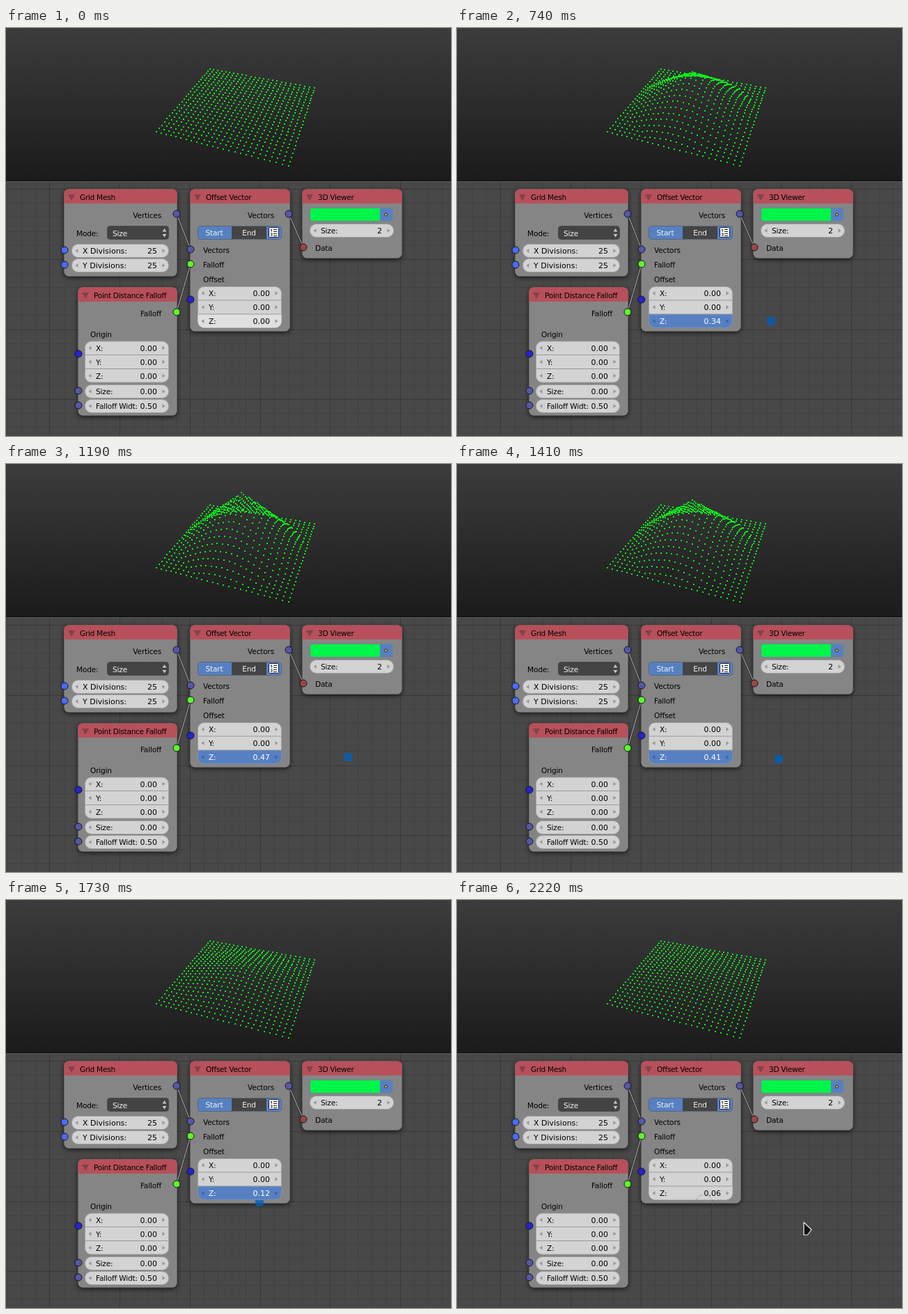
Animation, 639 px wide and 586 px high, one loop 2260 ms. Source, as an HTML page:

```html
<!DOCTYPE html>
<html lang="en">
<head>
<meta charset="utf-8">
<title>Offset with falloff</title>
<style>
  html, body { margin: 0; width: 100%; height: 100%; overflow: hidden; background: #484848; }
  svg { display: block; }
  text { font: 10.6px "DejaVu Sans", sans-serif; letter-spacing: -.2px; fill: #000; }
  .title { letter-spacing: -.3px; }
  .value { font-size: 11px; letter-spacing: 0; }
  .light { fill: #f2f2f2; }
  .field { fill: #d3d3d3; stroke: #a0a0a0; }
  .arrow { fill: #979797; }
</style>
</head>
<body>
<svg id="stage" width="639" height="586" viewBox="0 0 639 586">
  <defs>
    <linearGradient id="sky" x2="0" y2="1">
      <stop stop-color="#3c3c3c"/><stop offset="1" stop-color="#1b1b1b"/>
    </linearGradient>
    <filter id="shadow" x="-10%" y="-10%" width="120%" height="125%">
      <feDropShadow dx="0" dy="2" stdDeviation="3.5" flood-color="#000" flood-opacity=".7"/>
    </filter>
    <clipPath id="stack"><rect x="275.5" y="371.5" width="120" height="59" rx="9"/></clipPath>
  </defs>
  <rect width="639" height="219" fill="url(#sky)"/>
  <path id="dots" fill="#0ced1a" shape-rendering="crispEdges"/>
  <rect y="220" width="639" height="366" fill="#484848"/>
  <path id="minor" stroke="#414141" fill="none"/>
  <path id="major" stroke="#383838" fill="none"/>
  <path d="M0 219.5H639" stroke="#0c0c0c"/>
  <path d="M0 220.5H639" stroke="#5a5a5a"/>
  <g id="nodes"></g>
  <circle id="ring" cx="355" cy="435" fill="none" stroke="#2c7f9c" stroke-dasharray="4 3"/>
  <path id="pointer" d="M0 0L11 10.5L5.5 18H0Z" fill="#111" stroke="#f4f4f4" stroke-width="1.2" stroke-linejoin="round"/>
</svg>
<script>
const LOOP = 2260, STEP = 40, COUNT = 25;
const VIOLET = '#5656a8', BLUE = '#2424d0', INT = '#4a6cf5', GREEN = '#5cf52e', RED = '#9c4646';
const ACCENT = '#5680c2';
const $ = id => document.getElementById(id);

// --- static interface ---
const label = (x, y, s, anchor = 'start', cls = '') =>
  `<text x="${x}" y="${y}" text-anchor="${anchor}" class="${cls}">${s}</text>`;

const box = (x, y, w, h, r, attrs) =>
  `<rect x="${x}" y="${y}" width="${w}" height="${h}" rx="${r}" ${attrs}/>`;

const node = (x, y, w, h, title) =>
  box(x - .5, y - .5, w + 1, h + 1, 6.5, 'fill="#858585" filter="url(#shadow)"') +
  `<path d="M${x - .5} ${y + 20}v-14q0 -6.500 6.500 -6.500h${w - 12}q6.500 0 6.500 6.500v14z" fill="#b7505a"/>` +
  `<path d="M${x + 5} ${y + 7}h10l-5 9z" fill="#83404a"/>` +
  label(x + 22, y + 15, title, 'start', 'title');

const row = (x, y, w, name, value, { id = '', cls = '' } = {}) =>
  `<path class="arrow" d="M${x + 5.5} ${y}l4 -3v6zM${x + w - 5.5} ${y}l-4 -3v6z"/>` +
  label(x + 16, y + 4, name, 'start', cls) +
  `<text id="${id}" class="value" x="${x + w - 17}" y="${y + 4}" text-anchor="end">${value}</text>`;

const field = (x, y, w, name, value, options) =>
  box(x + .5, y - 9.5, w - 1, 19, 9, 'class="field"') + row(x, y, w, name, value, options);

const vector = (x, y, extra = '', id = '') =>
  box(x + .5, y + .5, 120, 59, 9, 'class="field"') + extra +
  `<path d="M${x + 1} ${y + 20}h119m-119 20h119" stroke="#999"/>` +
  ['X:', 'Y:', 'Z:'].map((n, i) => row(x, y + 10 + 20 * i, 121, n, '0.00', { id: i == 2 ? id : '' })).join('');

const socket = (x, y, color) =>
  `<circle cx="${x}" cy="${y}" r="5" fill="${color}" stroke="#15151a"/>`;

const link = (x1, y1, x2, y2) => {
  const d = `M${x1} ${y1}L${x2} ${y2}`;
  return `<path d="${d}" stroke="#222" stroke-width="3" stroke-opacity=".5"/><path d="${d}" stroke="#b4b4b4"/>`;
};

const gridMesh = node(84, 232, 161, 124, 'Grid Mesh') +
  label(223, 273, 'Vertices', 'end') + label(101, 299, 'Mode:') +
  box(145.5, 284.5, 88, 19, 4, 'fill="#434343" stroke="#4a4a4a"') + label(153, 299, 'Size', 'start', 'light') +
  '<path d="M224.500 292.500l3 -4.500 3 4.500zM224.500 296l3 4.500 3 -4.500z" fill="#c8c8c8"/>' +
  field(94, 320, 140, 'X Divisions:', 25, { cls: 'value' }) +
  field(94, 341, 140, 'Y Divisions:', 25, { cls: 'value' });

const falloff = node(104, 373, 141, 183, 'Point Distance Falloff') +
  label(223, 414, 'Falloff', 'end') + label(121, 444, 'Origin') + vector(113, 449.5) +
  field(113, 522, 121, 'Size:', '0.00') + field(113, 543, 121, 'Falloff Widt:', '0.50');

const listIcon = box(377.5, 286.5, 14, 14, 1, 'fill="#f5f5f5" stroke="#141c4c"') +
  '<path d="M380 289.500h1.500v3M380 295h2v3h-2M384 289.500h5m-5 3h5m-5 3h5m-5 3h5" fill="none" stroke="#222"/>';

const press = '<rect id="press" x="-6" y="-6" width="12" height="12" rx="4" fill="#0060b8" opacity=".8"/>';

const offset = node(265, 232, 142, 203, 'Offset Vector') +
  label(385, 273, 'Vectors', 'end') +
  box(275.5, 284.5, 120, 19, 4, `fill="${ACCENT}" stroke="#5c6674"`) +
  '<path d="M324 285h50v18h-50z" fill="#444"/>' +
  label(299, 298, 'Start', 'middle', 'light') + label(349, 298, 'End', 'middle', 'light') + listIcon +
  label(283, 323, 'Vectors') + label(283, 344, 'Falloff') + label(283, 365, 'Offset') + press +
  vector(275, 371, '<rect id="zRow" x="275" y="411" width="121" height="20" clip-path="url(#stack)"/>', 'zText');

const viewer = node(426, 232, 142, 98, '3D Viewer') +
  box(436.5, 258.5, 119, 19, 4, `fill="${ACCENT}" stroke="#7c8288"`) +
  '<path d="M537 259h-97q-3 0 -3 3v12q0 3 3 3h97z" fill="#00f54a"/>' +
  '<circle cx="545.500" cy="268" r="2" fill="#f0b060" stroke="#222"/>' +
  field(436, 291, 121, 'Size:', 2) + label(444, 320, 'Data');

$('nodes').innerHTML = gridMesh + falloff + offset + viewer +
  link(245, 267, 265, 318) + link(245, 408, 265, 339) + link(406, 267, 427, 315) +
  [[245, 267, VIOLET], [84, 319, INT], [84, 340, INT], [265, 318, VIOLET], [265, 339, GREEN],
   [265, 390, BLUE], [245, 408, GREEN], [104, 468, BLUE], [104, 521, VIOLET], [104, 542, VIOLET],
   [406, 267, VIOLET], [427, 315, RED]].map(s => socket(...s)).join('');

// Every fifth line of the background grid is stronger.
const UNIT = 20.14, LEFT = 62.9, TOP = 231.6;
const lines = { minor: '', major: '' };
for (let i = -3; i < 29; i++) {
  const x = Math.floor(LEFT + i * UNIT) + .5, y = Math.floor(TOP + i * UNIT) + .5;
  lines[i % 5 ? 'minor' : 'major'] += `M${x} 221V586` + (y > 221 ? `M0 ${y}H639` : '');
}
for (const id in lines) $(id).setAttribute('d', lines[id]);

// --- motion ---
// Runs of regular steps [first, last]; the picture holds after each run.
const RUNS = [[0, 0], [300, 740], [790, 1190], [1240, 1240], [1330, 1850], [1980, 2220]];
const HEIGHT = [[300, 0], [460, .16], [740, .34], [790, .36], [1190, .47], [1240, .48],
                [1330, .48], [1570, .26], [1730, .12], [1850, .07], [1980, .06]];
const DRAG_X = [[300, 349], [460, 397], [740, 451], [790, 457], [1190, 491], [1240, 495],
                [1330, 491], [1570, 403], [1730, 364], [1850, 355]];
const DRAG_Y = [[1190, 421], [1570, 427], [1730, 434], [1850, 435]];

function held(t) {
  const [first, last] = RUNS.filter(r => r[0] <= t).pop();
  return Math.min(last, first + Math.floor((t - first) / STEP) * STEP);
}

function track(keys, t) {
  const i = keys.findIndex(k => k[0] > t);
  if (i === 0) return keys[0][1];
  if (i < 0) return keys[keys.length - 1][1];
  const [t0, a] = keys[i - 1], [t1, b] = keys[i];
  return a + (b - a) * (t - t0) / (t1 - t0);
}

// Perspective view of the unit square, with z pointing up.
function project(u, v, z) {
  const w = 1 - .0963 * u - .2288 * v - .1818 * z;
  return [(292.6 + 107.73 * u - 126.33 * v - 61.4 * z) / w,
          (59 + 18.72 * u + 55.91 * v - 139.3 * z) / w];
}

function dotsPath(height) {
  let d = '';
  for (let i = 0; i < COUNT; i++) for (let j = 0; j < COUNT; j++) {
    const u = i / (COUNT - 1), v = j / (COUNT - 1);
    const strength = Math.max(0, 1 - Math.hypot(u - .5, v - .5) / .5);
    const [x, y] = project(u, v, height * strength);
    d += `M${Math.round(x) - 1} ${Math.round(y) - 1}h2v2h-2z`;
  }
  return d;
}

const show = (el, on) => el.setAttribute('visibility', on ? 'visible' : 'hidden');
const move = (el, x, y) => el.setAttribute('transform', `translate(${x} ${y})`);

const zText = $('zText'), zName = zText.previousElementSibling, zArrows = zName.previousElementSibling;

let shown = -1;
function render(time) {
  const t = held(time % LOOP);
  if (t === shown) return;
  shown = t;
  const z = track(HEIGHT, t);
  const dragging = t >= 300 && t < 1980, released = t >= 1980;
  const p = Math.max(0, (t - 1980) / 240);
  const px = 349 + 149 * p, py = 421 + 42 * p;
  const hover = t < 300 || released && px < 396 && py < 430;

  $('dots').setAttribute('d', dotsPath(z));
  $('zRow').setAttribute('fill', dragging ? ACCENT : hover ? '#e0e0e0' : '#d3d3d3');
  zText.textContent = z.toFixed(2);
  zText.style.fill = zName.style.fill = dragging ? '#fff' : '#000';
  zArrows.style.fill = dragging ? '#3d639f' : '';

  show($('press'), dragging);
  move($('press'), Math.round(track(DRAG_X, t)), Math.round(track(DRAG_Y, t)));
  show($('ring'), released);
  $('ring').setAttribute('r', 6 + 6 * p);
  $('ring').setAttribute('opacity', .9 - .4 * p);
  show($('pointer'), released);
  move($('pointer'), px, py);
}

let start;
function tick(now) {
  start ??= now;
  render(now - start);
  requestAnimationFrame(tick);
}
render(0);
requestAnimationFrame(tick);
</script>
</body>
</html>
```
